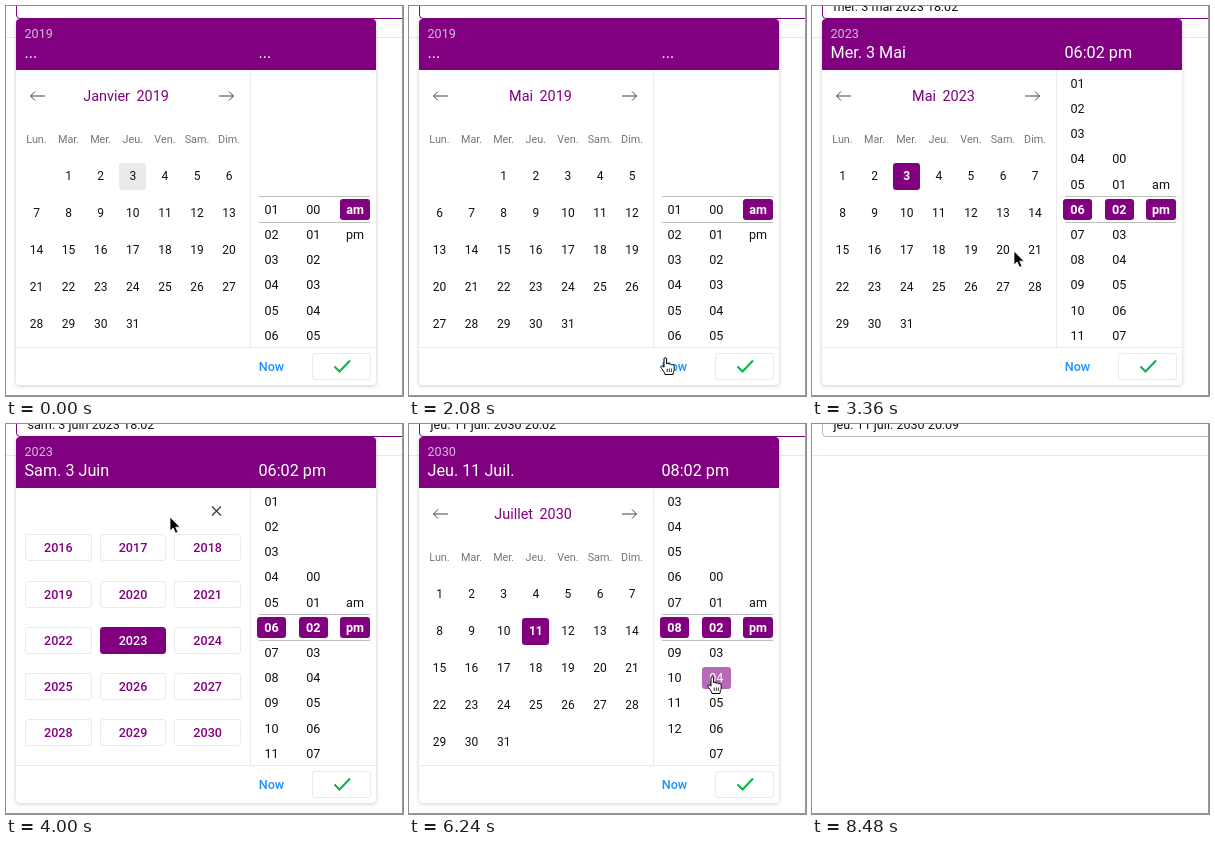
Animation of 397 by 390 pixels, one loop 8.8 s. Source, as an HTML page:

```html
<!DOCTYPE html>
<html lang="fr">
<head>
<meta charset="utf-8">
<title>Date picker</title>
<style>
html, body { margin: 0; width: 100%; height: 100%; overflow: hidden; background: #fff; }
body { font: 12.6px Roboto, sans-serif; color: #111; }
#stage { position: relative; width: 397px; height: 390px; overflow: hidden; }
#stage * { box-sizing: border-box; }
#stage div, b, svg { position: absolute; }
b { font-weight: 400; text-align: center; white-space: pre; border-radius: 3px; }
.input { left: 10px; top: -30px; width: 400px; height: 43px; border: 1px solid #800080; border-radius: 4px; }
.input.blur { border-color: #bbb; }
.rule { left: 0; top: 31px; width: 397px; height: 1px; background: #e8e8e8; }
.edge { inset: 0; border: solid #999; border-width: 0 1px 1px 0; }
.panel { left: 10px; top: 13px; width: 360px; height: 366px; background: #fff; border-radius: 4px; box-shadow: 0 1px 4px rgba(0,0,0,.2); }
.head { left: 10px; top: 13px; width: 360px; height: 51px; background: #800080; border-radius: 4px 4px 0 0; }
.wheel { left: 0; top: 65px; width: 370px; height: 276px; overflow: hidden; }
.line { background: #eaeaea; }
.mark { background: #bdbdbd; }
.left { text-align: left; }
.white { color: #fff; font-size: 16.2px; }
.dim { color: rgba(255,255,255,.72); }
.title { color: #800080; font-size: 14.4px; }
.week { color: #757575; font-size: 10.8px; }
.day { font-size: 12px; }
.today { background: #eaeaea; }
.pick { position: static; font-weight: 500; color: #800080; border: 1px solid #eaeaea; padding: 0 18px; height: 27px; line-height: 25px; }
.row { left: 19px; width: 216px; display: flex; justify-content: space-between; }
.on { background: #800080; color: #fff; font-weight: 700; }
.pick.on { font-weight: 500; border-color: #800080; }
.over { background: #b66bb6; color: #fff; }
.now { color: #1e90ff; font-weight: 500; }
.ok { border: 1px solid #eaeaea; }
svg { left: 0; top: 0; overflow: visible; fill: none; }
</style>
</head>
<body>
<div id="stage"></div>
<script>
const STEP = 160, STEPS = 55, PITCH = 25.2;
const MONTHS = 'Janv. Févr. Mars Avr. Mai Juin Juil. Août Sept. Oct. Nov. Déc.'.split(' ');
const LONG = { 0: 'Janvier', 4: 'Mai', 5: 'Juin', 6: 'Juillet' };
const WEEK = 'Lun. Mar. Mer. Jeu. Ven. Sam. Dim.'.split(' ');

const start = {
  view: 'days', m: 0, y: 2019, d: 0, hour: 0, min: 0, ap: 0,
  hourPos: 1, minPos: 0, apPos: 0, p: null, hand: 0, over: '', alpha: 1, blur: 0
};

// [step, cursor, hovered item, other changes]
const story = [
  [2, [197, 96]], [3, [152, 94]], [4, [112, 92], 'hand'], [6, [108, 91], 'month'], [7, [104, 90], 'month'],
  [9, [98, 88], '', { view: 'months' }], [10, [124, 187], 'm4'],
  [11, [130, 195], '', { view: 'days', m: 4 }], [12, [200, 290]], [13, [256, 352], 'hand'],
  [14, [256, 352], 'hand', { d: 3, hour: 6, min: 2, ap: 1, hourPos: 4, minPos: 1.2, apPos: .6 }],
  [15, [254, 350], 'hand', { hourPos: 6, minPos: 2, apPos: 1 }],
  [16, [205, 220]], [17, [148, 87], 'year'], [18, [152, 96], '', { view: 'years' }],
  [19, [178, 185]], [20, [200, 260], 'y2023'], [21, [202, 245], '', { view: 'days', y: 2023 }],
  [22, [219, 90], 'hand'], [23, [219, 90], 'hand', { m: 5 }], [24, [150, 88], 'year'],
  [25, [164, 93], '', { view: 'years' }], [26, [188, 210]], [27, [201, 310], 'y2030'],
  [28, [202, 300], '', { view: 'days', y: 2030 }], [29, [213, 180]], [30, [219, 90], 'hand'],
  [31, [219, 90], 'hand', { m: 6 }], [32, [127, 206], 'd11'], [33, [127, 206], 'hand', { d: 11 }],
  [34, [200, 232]], [35, [265, 253], 'h8'], [36, [265, 253], 'hand', { hour: 8, hourPos: 7.2 }],
  [37, [268, 254], 'hand', { hourPos: 8 }], [38, [286, 254]], [39, [303, 253], 'n4'],
  [40, [303, 253], 'hand', { min: 4, minPos: 3.2 }], [41, [305, 270], 'hand', { minPos: 4 }],
  [42, [306, 327], 'n9'], [43, [306, 327], 'hand', { min: 9, minPos: 7 }],
  [44, [308, 328], 'hand', { minPos: 9 }], [45, [334, 342]], [46, [350, 353], 'ok'], [47, [355, 353], 'ok'],
  [49, [355, 353], 'ok', { alpha: .85 }], [50, [355, 354], '', { alpha: .5 }],
  [51, [355, 354], '', { alpha: .15 }], [52, [355, 354], '', { alpha: 0 }],
  [53, null, '', { blur: 1 }]
];

function stateAt(step) {
  const s = { ...start };
  for (const [at, p, over = '', more] of story) {
    if (at > step) break;
    Object.assign(s, { p, over, hand: over !== '' }, more);
  }
  return s;
}

const two = n => String(n).padStart(2, '0');
const rect = (cls, x, y, w, h) => `<div class="${cls}" style="left:${x}px;top:${y}px;width:${w}px;height:${h}px"></div>`;
// Label in a box centred on (x, y)
const label = (text, x, y, cls = '', w = 28, h = 22) =>
  `<b class="${cls}" style="left:${x - w / 2}px;top:${y - h / 2}px;width:${w}px;height:${h}px;line-height:${h}px">${text}</b>`;
const leftText = (text, x, y, cls = '') => label(text, x + 70, y, 'left ' + cls, 140);
const svg = body => `<svg width="397" height="390">${body}</svg>`;
const path = (d, color, w = 1) => `<path d="${d}" stroke="${color}" stroke-width="${w}"/>`;
const mark = (on, over) => on ? ' on' : over ? ' over' : '';

function days(s) {
  const first = (new Date(Date.UTC(s.y, s.m, 1)).getUTCDay() + 6) % 7;
  const count = new Date(Date.UTC(s.y, s.m + 1, 0)).getUTCDate();
  const colX = i => 30.5 + 32.1 * i;
  let out = svg(path('M39 90H24.5M29 85.5L24.5 90L29 94.5M213 90H227.5M223 85.5L227.5 90L223 94.5', '#444'));
  out += `<b class="title${mark(0, s.over === 'month')}" style="right:269px;top:78px;padding:0 4px;line-height:25px">${LONG[s.m]}</b>`;
  out += label(s.y, 146.7, 90.5, 'title' + mark(0, s.over === 'year'), 36, 25);
  WEEK.forEach((name, i) => out += label(name, colX(i), 133.5, 'week'));
  for (let d = 1; d <= count; d++) {
    const cell = first + d - 1;
    const today = d === 3 && s.m === 0 && s.y === 2019 ? ' today' : '';
    out += label(d, colX(cell % 7), 170.5 + 37 * Math.floor(cell / 7),
      'day' + today + mark(d === s.d, s.over === 'd' + d), 27, 27);
  }
  return out;
}

function picker(items, top, pitch) {
  let out = svg(path('M206 82.5L215 91.5M215 82.5L206 91.5', '#333', 1.1));
  for (let i = 0; i < items.length; i += 3) {
    const row = items.slice(i, i + 3).map(([text, cls]) => `<b class="pick${cls}">${text}</b>`).join('');
    out += `<div class="row" style="top:${top + pitch * i / 3}px">${row}</div>`;
  }
  return out;
}

const views = {
  days,
  months: s => picker(MONTHS.map((name, i) => [name, mark(0, s.over === 'm' + i)]), 116, 58),
  years: s => picker(Array.from({ length: 15 }, (_, i) => {
    const y = s.y - 7 + i;
    return [y, mark(y === s.y, s.over === 'y' + y)];
  }), 110.3, 46.25)
};

function column(x, from, to, pos, selected, text, over) {
  let out = '';
  for (let n = from; n <= to; n++) {
    const y = 138.5 + (n - pos) * PITCH;
    if (y > -15 && y < 290) out += label(text(n), x, y, mark(n === selected, over === n), 29.5, 21.5);
  }
  return out;
}

function wheels(s) {
  const hovered = key => s.over[0] === key ? +s.over.slice(1) : -1;
  return '<div class="wheel">' +
    rect('mark', 253, 125, 111, 1) + rect('mark', 253, 151, 111, 1) +
    column(265.5, 1, 12, s.hourPos, s.hour, two, hovered('h')) +
    column(307.3, 0, 59, s.minPos, s.d ? s.min : -1, two, hovered('n')) +
    column(349, 0, 1, s.apPos, s.ap, n => ['am', 'pm'][n]) + '</div>';
}

function check(s) {
  return svg(s.over === 'ok'
    ? '<rect x="327" y="355" width="18" height="9.5" fill="#00c853"/>' + path('M330 360L334 363L344 357', '#fff', 1)
    : path('M328.5 360.5L333.5 365.5L344 354.5', '#00b74a', 2));
}

function cursor(s) {
  if (!s.p) return '';
  const [x, y] = s.p;
  return svg(s.hand
    ? `<g transform="translate(${x - 5} ${y - 1})" stroke="#000"><path fill="#fff" d="M5 17.5C5 15 1 11.5 .8 10C.7 8.6 2.4 8.4 3.6 10L4 10.3V2C4 .2 6.6 .2 6.6 2V7C6.8 5.8 9 6 9 7.4C9.4 6.4 11.5 6.6 11.6 8C12 7.2 14.2 7.4 14.2 9V12C14.2 14 13 15 13 17.5Z"/><path d="M7.2 11.5V15M9.3 11.5V15M11.4 11.5V15" stroke-width=".8"/></g>`
    : `<path transform="translate(${x} ${y})" d="M0 0V14L3.2 11L5.5 16.2L8 15.2L5.7 10.2H10Z" fill="#000" stroke="#fff" stroke-width=".8"/>`);
}

function render(s) {
  const weekday = WEEK[(new Date(Date.UTC(s.y, s.m, s.d)).getUTCDay() + 6) % 7];
  const date = s.d ? `${weekday} ${s.d} ${MONTHS[s.m]}` : '...';
  const time = s.d ? `${two(s.hour)}:${two(s.min)} pm` : '...';
  const value = s.d ? `${weekday} ${s.d} ${MONTHS[s.m]} ${s.y} ${s.hour + 12}:${two(s.min)}`.toLowerCase() : '';
  const panel = rect('panel', 10, 13, 360, 366) + rect('head', 10, 13, 360, 51) +
    leftText(s.y, 18.5, 27.5, 'dim') + leftText(date, 18.5, 47, 'white') + leftText(time, 252.5, 47, 'white') +
    rect('line', 244, 64, 1, 278) + rect('line', 10, 341, 360, 1) +
    views[s.view](s) + wheels(s) +
    label('Now', 265.5, 361, 'now', 40) + rect('ok', 306, 347, 59, 27) +
    '<style>.ok{border-radius:3px}</style>' + check(s);
  return '<div class="rule"></div>' + `<div class="input${s.blur ? ' blur' : ''}"></div>` +
    leftText(value, 21.5, 1.2) +
    (s.alpha ? `<div style="inset:0;opacity:${s.alpha};transform:translateY(${(s.alpha - 1) * 8}px)">${panel}</div>` : '') +
    '<div class="edge"></div>' + cursor(s);
}

const stage = document.getElementById('stage');
let shown = -1;
function tick() {
  const step = Math.floor(performance.now() / STEP) % STEPS;
  if (step !== shown) stage.innerHTML = render(stateAt(shown = step));
  requestAnimationFrame(tick);
}
tick();
</script>
</body>
</html>
```
